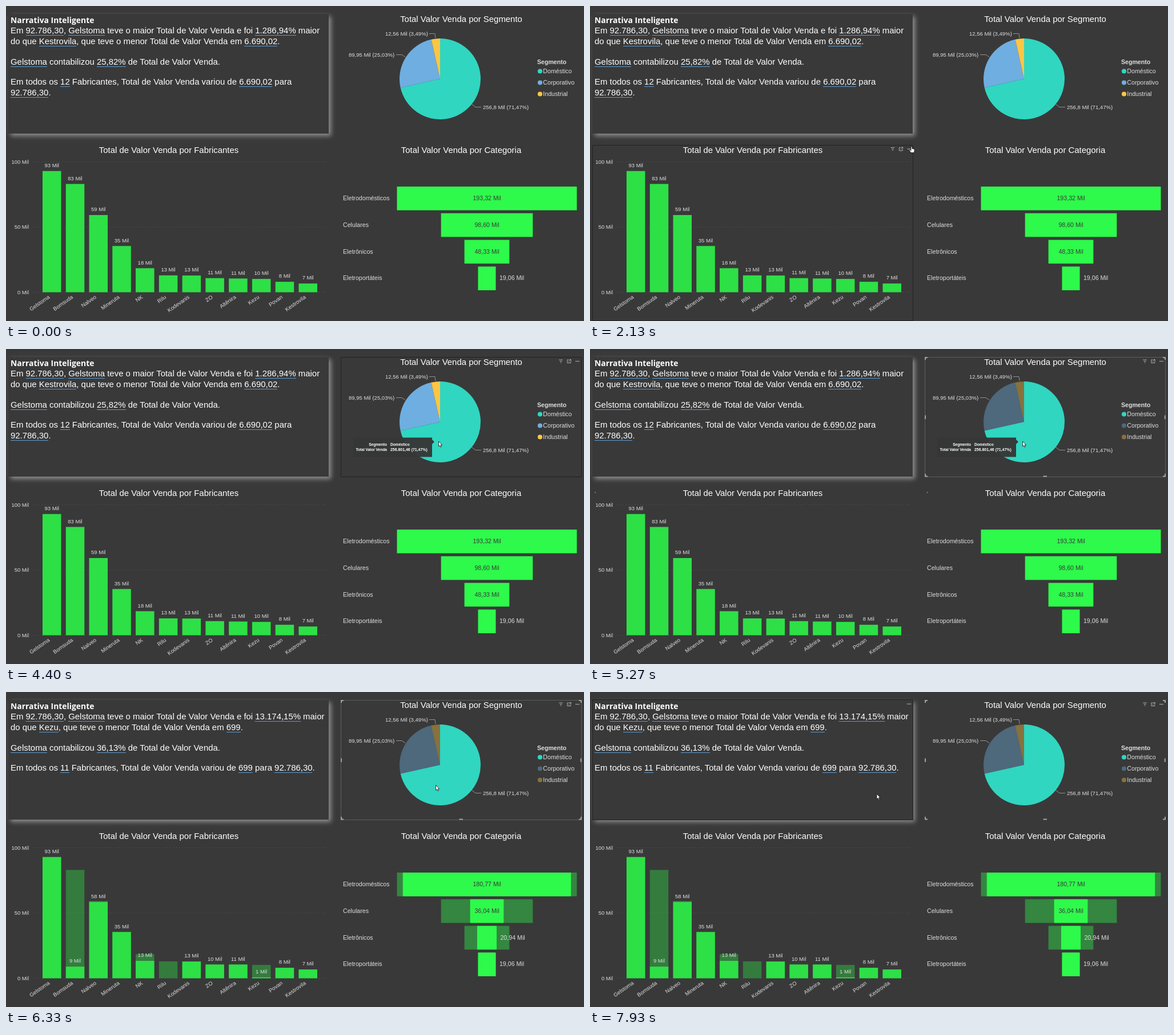
Animation, 1012 px wide and 553 px high, one loop 8 s. Source, as an HTML page:

```html
<!DOCTYPE html>
<html lang="pt-BR">
<head>
<meta charset="utf-8">
<title>Painel de vendas</title>
<style>
  html, body { margin: 0; width: 100%; height: 100%; overflow: hidden; background: #393939; }
  body, text { font-family: "Liberation Sans", Arial, sans-serif; }
  #stage { position: absolute; left: 0; top: 0; width: 1012px; height: 553px; overflow: hidden; }
  #card { position: absolute; left: 4px; top: 14px; width: 561px; height: 210px;
    background: #393939; box-shadow: 4px 4px 8px #909090; }
  .line { position: absolute; left: 8px; color: #fff; font-size: 14.93px; line-height: 18px; white-space: pre; }
  .line b { font: 700 13.9px/18px "Open Sans", "Noto Sans", sans-serif; }
  .line u { text-decoration: none; border-bottom: 1px solid #5b9bd0; }
  svg { position: absolute; left: 0; top: 0; }
</style>
</head>
<body>
<div id="stage">
  <div id="card"></div>
  <div id="story"></div>
  <svg id="view" width="1012" height="553" viewBox="0 0 1012 553"></svg>
</div>
<script>
const LOOP = 8000, CLICK = 5270, SWAP = 5400, TIP_ON = 4400, TIP_OFF = 6310;
const BAR = '#2de046', FUNNEL = '#2efa4b', SOFT = '#dedede', DIM = 0.4;

// name, total, total after the filter
const makers = [
  ['Gelstoma', 92.79, 92.79], ['Bomsuda', 82.9, 8.9], ['Nalveo', 59.1, 58.4], ['Mineruta', 35.4, 35.4],
  ['NK', 18.4, 13.3], ['Rilu', 12.9, 0], ['Kodevanis', 12.8, 12.8], ['ZO', 10.8, 10.4],
  ['Altênira', 10.5, 10.5], ['Kezu', 10.2, 0.7], ['Povan', 8, 8], ['Kestrovila', 6.69, 6.69]
];
const groups = [
  ['Eletrodomésticos', 193.32, 180.77], ['Celulares', 98.6, 36.04],
  ['Eletrônicos', 48.33, 20.94], ['Eletroportáteis', 19.06, 19.06]
];
const segments = [
  ['Doméstico', 0.7147, '#30d6c0'], ['Corporativo', 0.2504, '#6faee0'], ['Industrial', 0.0349, '#fcc544']
];

// cursor path: time, x, y
const path = [
  [1200, 700, 557], [1270, 690, 545], [1700, 602, 330], [2000, 562, 252], [2130, 563, 246],
  [2330, 561, 254], [2730, 577, 199], [3266, 577, 199], [3730, 721.5, 176], [4000, 757.5, 162],
  [6266, 757.5, 162], [6330, 753, 163.5], [7130, 427, 181], [7733, 427, 181], [7930, 502, 179]
];

// panels: x, y, right, bottom, icon centre x, icon y
const panels = {
  story: [4.5, 13.5, 565.5, 224.5, 558.5, 21],
  bars: [4.5, 244.5, 565.5, 552.5, 559, 251],
  pie: [586.5, 14.5, 1007.5, 224.5, 1000.5, 21.5],
  funnel: [586.5, 244.5, 1007.5, 552.5, 1000.5, 251]
};

const rect = (x, y, w, h, fill, o = 1) =>
  `<rect x="${x}" y="${y}" width="${w}" height="${h}" fill="${fill}" opacity="${o}"/>`;
const line = (d, stroke, extra = '') => `<path d="${d}" fill="none" stroke="${stroke}" ${extra}/>`;
const text = (s, x, y, size, anchor = 'start', fill = SOFT, extra = '') =>
  `<text x="${x}" y="${y}" font-size="${size}" text-anchor="${anchor}" fill="${fill}" ${extra}>${s}</text>`;
const money = v => v.toFixed(2).replace('.', ',') + ' Mil';

function cursorAt(t) {
  if (t < path[0][0]) return null;
  const i = path.findIndex(p => p[0] > t);
  if (i < 0) return path[path.length - 1].slice(1);
  const [a, x, y] = path[i - 1], [b, X, Y] = path[i];
  const k = (t - a) / (b - a);
  return [x + (X - x) * k, y + (Y - y) * k];
}

function hovered(t, c) {
  if (t >= 1130 && t < 1270) return 'funnel';
  if (!c) return '';
  return Object.keys(panels).find(k => {
    const [x, y, r, b] = panels[k];
    return c[0] > x && c[0] < r && c[1] > y && c[1] < b + 1;
  }) || '';
}

function pie(chosen) {
  const cx = 760, cy = 128, r = 71;
  let a = 0, out = '';
  segments.forEach(([name, part, color], i) => {
    const b = a + part * 2 * Math.PI, o = chosen && i ? DIM : 1;
    const at = q => `${cx + r * Math.sin(q)} ${cy - r * Math.cos(q)}`;
    out += `<path d="M${cx} ${cy}L${at(a)}A${r} ${r} 0 ${part > 0.5 ? 1 : 0} 1 ${at(b)}Z" fill="${color}" opacity="${o}"/>`;
    out += `<circle cx="935" cy="${114.5 + 20 * i}" r="4.1" fill="${color}" opacity="${o}"/>`;
    out += text(name, 940.3, 117.8 + 20 * i, 10.65);
    a = b;
  });
  return out;
}

const header =
  text('Total Valor Venda por Segmento', 797, 28, 14.93, 'middle', '#fff') +
  text('Total de Valor Venda por Fabricantes', 285, 257.7, 14.93, 'middle', '#fff') +
  text('Total Valor Venda por Categoria', 797, 257.7, 14.93, 'middle', '#fff') +
  text('Segmento', 930, 101.7, 10.6, 'start', SOFT, 'font-weight="700"') +
  text('256,8 Mil (71,47%)', 835, 181, 9.55) +
  text('89,95 Mil (25,03%)', 600, 88.8, 9.55) +
  text('12,56 Mil (3,49%)', 664, 52, 9.55) +
  line('M815 172L822 177.5H832M683 85.5H693L699 89.5M741 48.5H751L752 56', '#929292') +
  [100, 50, 0].map((v, i) => text(v + ' Mil', 40, 276.8 + 114.6 * i, 9.5, 'end') +
    line(`M48 ${273.5 + 114.5 * i}H561`, '#5a5a5a', 'stroke-dasharray="1 4"')).join('') +
  makers.map(([n], i) => text(n, 0, 0, 9.5, 'end', SOFT,
    `transform="translate(${77.3 + 40.77 * i} 512.5) rotate(-35)"`)).join('') +
  groups.map(([n], i) => text(n, 590, 341 + 46.8 * i, 10.65)).join('');

function barChart(chosen, k) {
  const base = 502.5, scale = 2.293;
  return makers.map(([, all, some], i) => {
    const x = 64 + 40.77 * i, v = all + (some - all) * k, h = v * scale;
    const label = k > 0 ? some : all;
    return (chosen ? rect(x, base - all * scale, 32.5, all * scale, BAR, DIM) : '') +
      rect(x, base - h, 32.5, h, BAR) +
      (label ? text((label === 58.4 ? 58 : Math.round(label)) + ' Mil', x + 16.2, base - h - 6.8, 9.5, 'middle') : '');
  }).join('');
}

function funnelChart(chosen, k) {
  const cx = 842, scale = 1.629;
  return groups.map(([, all, some], i) => {
    const y = 317 + 46.8 * i, w = (all + (some - all) * k) * scale, W = all * scale;
    const label = k > 0 ? some : all, inside = label > 30;
    return (chosen ? rect(cx - W / 2, y, W, 41.6, FUNNEL, DIM) : '') +
      rect(cx - w / 2, y, w, 41.6, FUNNEL) +
      (inside ? text(money(label), cx, y + 24, 10.65, 'middle', '#3a3a3a')
              : text(money(label), cx + w / 2 + 6.4, y + 24, 10.65));
  }).join('');
}

function icons(name) {
  const [, , , , x, y] = panels[name];
  const dots = [-2.4, 0, 2.4].map(d => `<circle cx="${x + d}" cy="${y}" r=".85" fill="#d0d0d0"/>`).join('');
  if (name === 'story') return dots;
  const f = x - 29, g = x - 14.5;
  return dots +
    line(`M${f - 3.3} ${y - 2.5}h6.6M${f - 2} ${y}h4M${f - 0.9} ${y + 2.5}h1.8`, '#bdbdbd', 'stroke-width=".9"') +
    line(`M${g - 0.6} ${y - 2.6}h-2.5v5.6h5.8v-2.6M${g - 1} ${y + 0.8}l4-3.8M${g + 0.6} ${y - 3}h2.6v2.6`, '#bdbdbd', 'stroke-width=".9"');
}

function frame(name, color) {
  const [x, y, r, b] = panels[name];
  return line(`M${x} ${y}H${r}V${b}H${x}Z`, color);
}

function handles() {
  return line('M587 19V15H591M1003 15H1007V19M587 219V223.5H591M1003 223.5H1007V219' +
    'M793.5 223.5H800M587 116.5V123M1006.7 116.5V123', '#a2a2a2', 'stroke-width="2"');
}

function tooltip() {
  const bold = 'font-weight="700"';
  return `<path d="M608 155.5H746V159L750 163L746 167V189.5H608Z" fill="#353737" opacity=".97"/>` +
    text('Segmento', 667, 170.4, 6.6, 'end', '#fff', bold) +
    text('Total Valor Venda', 667, 179.3, 6.6, 'end', '#fff', bold) +
    text('Doméstico', 673, 170.4, 6.6, 'start', '#fff', bold) +
    text('256.801,46 (71,47%)', 673, 179.3, 6.95, 'start', '#fff', bold);
}

function pointer([x, y]) {
  const hand = x > 524 && x < 567 && y > 244 && y < 258;
  const d = hand
    ? 'M-1 .8Q0-.6 1 .8V4.2L4 5Q5.4 5.4 5.2 7L4.4 11.5H-1L-4 7.4Q-3.6 5.8-2.2 6.8L-1 7.8Z'
    : 'M0 0V9L2 7.2L3.4 10.3L4.9 9.6L3.5 6.6H6.2Z';
  return `<path d="${d}" transform="translate(${x} ${y})" fill="#fff" stroke="#111" stroke-width=".8"/>`;
}

function storyLines(filtered) {
  const start = 'Em <u>92.786,30</u>, <u>Gelstoma</u> teve o maior Total de Valor Venda e foi ';
  const all = filtered
    ? ['<u>13.174,15%</u> maior', 'Kezu', '699', '36,13%', '11', '699</u> para <u>92.786,30</u>.', '']
    : ['<u>1.286,94%</u> maior', 'Kestrovila', '6.690,02', '25,82%', '12', '6.690,02</u> para', '<u>92.786,30</u>.'];
  const [rate, least, low, share, count, range, rest] = all;
  const rows = [
    [30, '<b>Narrativa Inteligente</b>'],
    [48, start + rate],
    [67, `do que <u>${least}</u>, que teve o menor Total de Valor Venda em <u>${low}</u>.`],
    [103, `<u>Gelstoma</u> contabilizou <u>${share}</u> de Total de Valor Venda.`],
    [138, `Em todos os <u>${count}</u> Fabricantes, Total de Valor Venda variou de <u>${range}`],
    [157, rest]
  ];
  return rows.map(([y, s]) => `<div class="line" style="top:${y - 14}px">${s}</div>`).join('');
}

const view = document.getElementById('view'), story = document.getElementById('story');
let shown = null;

function render(t) {
  const c = cursorAt(t), over = hovered(t, c), chosen = t >= CLICK;
  const u = Math.min(1, Math.max(0, (t - CLICK - 20) / 250));
  const k = 1 - (1 - u) ** 3, filtered = t >= SWAP;
  if (shown !== filtered) {
    story.innerHTML = storyLines(filtered);
    shown = filtered;
  }
  let s = pie(chosen) + header + barChart(u > 0, k) + funnelChart(u > 0, k);
  if (over) s += frame(over, over === 'pie' && chosen ? '#5e5e5e' : '#222') + icons(over);
  if (chosen) s += handles() + (over === 'pie' ? '' : icons('pie'));
  if (chosen && !filtered && u < 0.4)
    s += [[8, 20], [8.5, 251], [590, 251]].map(([x, y]) => rect(x, y, 1.3, 1.3, '#ccc')).join('');
  if (t >= TIP_ON && t < TIP_OFF) s += tooltip();
  if (c) s += pointer(c);
  view.innerHTML = s;
}

const begin = performance.now();
function tick() {
  render((performance.now() - begin) % LOOP);
  requestAnimationFrame(tick);
}
tick();
</script>
</body>
</html>
```
